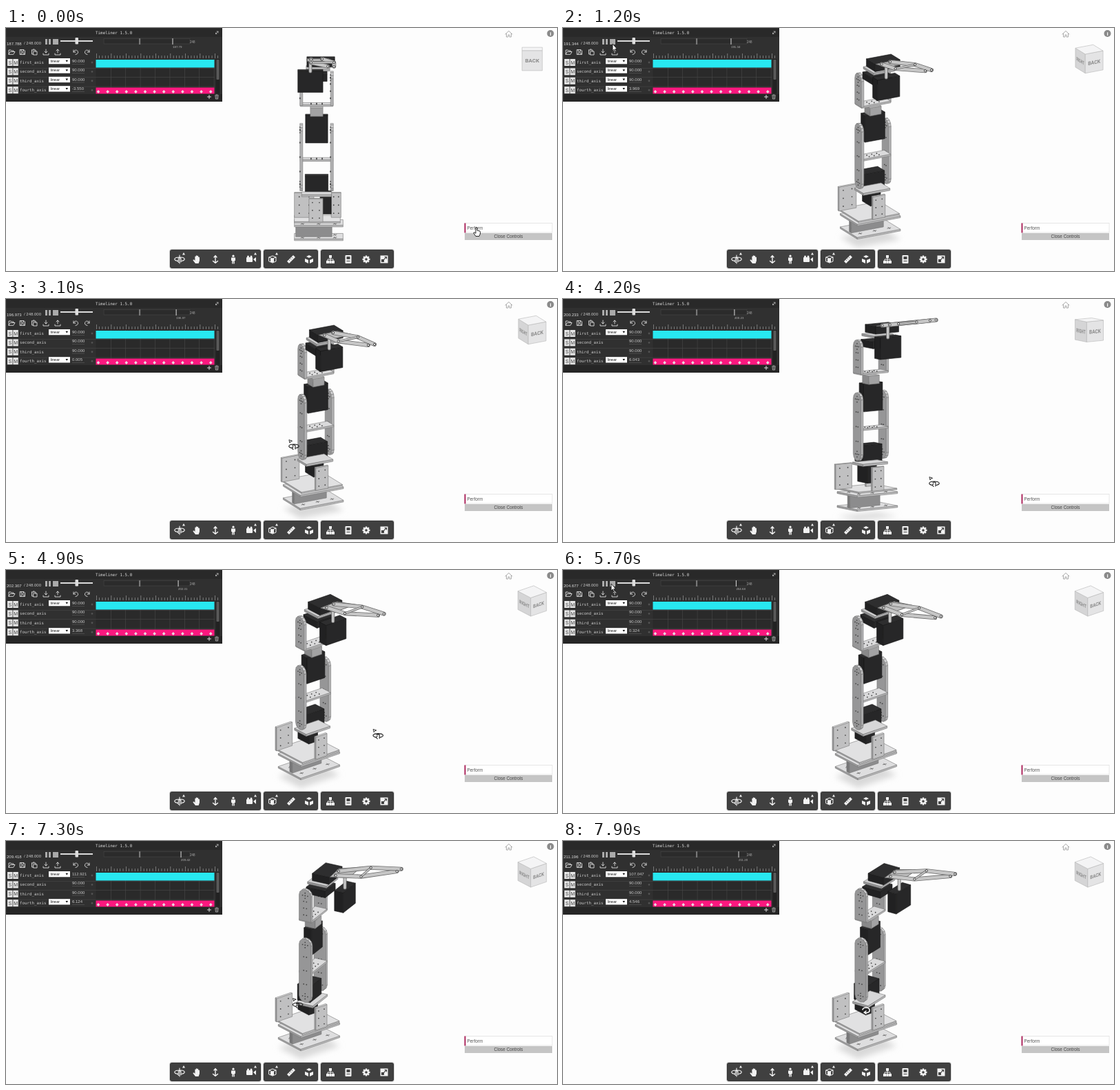
Write an HTML page that moves like this. It is 800x353 px and loops after 8 s.

```html
<!DOCTYPE html>
<html lang="en">
<head>
<meta charset="utf-8">
<title>Robot arm timeline</title>
<style>
html, body { margin: 0; width: 100%; height: 100%; overflow: hidden; background: #fdfdfd; }
svg { display: block; width: 800px; height: 353px; }
text { font-family: "Liberation Sans", Arial, sans-serif; }
.mono { font-family: "DejaVu Sans Mono", monospace; }
.line { fill: none; stroke-linecap: round; stroke-linejoin: round; }
</style>
</head>
<body>
<svg id="stage" viewBox="0 0 800 353"></svg>
<script>
const LOOP = 8000;
const stage = document.getElementById('stage');

// ---- drawing helpers ----
const rect = (x, y, w, h, fill, more = '') =>
  `<rect x="${x}" y="${y}" width="${w}" height="${h}" fill="${fill}" ${more}/>`;
const label = (x, y, size, fill, str, more = '') =>
  `<text x="${x}" y="${y}" font-size="${size}" fill="${fill}" ${more}>${str}</text>`;
const dot = (x, y, r, fill, more = '') =>
  `<circle cx="${x}" cy="${y}" r="${r}" fill="${fill}" ${more}/>`;
const line = (d, color, width) =>
  `<path class="line" d="${d}" stroke="${color}" stroke-width="${width}"/>`;
const fillPath = (d, color) => `<path d="${d}" fill="${color}"/>`;
const at = (x, y, body) => `<g transform="translate(${x} ${y})">${body}</g>`;
const range = (n, fn) => Array.from({ length: n }, (_, i) => fn(i));
const many = (n, fn) => range(n, fn).join('');
const xy = p => p[0].toFixed(2) + ' ' + p[1].toFixed(2);
const pathOf = pts => 'M' + pts.map(xy).join('L');

// ---- motion: each key is a time followed by its values ----
function track(keys, t) {
  const i = keys.findIndex(key => key[0] > t);
  if (i < 1) return keys.at(i).slice(1);
  const [a, b] = [keys[i - 1], keys[i]];
  const k = (t - a[0]) / (b[0] - a[0]);
  return a.slice(1).map((v, j) => v + (b[j + 1] - v) * k);
}
const playTime = t => 187.785 + t * .002963;
const firstAxis = [[6250, 90], [6450, 120.776], [6500, 120.776], [7900, 107.047]];
const fourthAxis = [[0, -3.556], [1200, 3.971], [3100, 0], [4200, 6.047], [5700, .314], [6500, 8.235], [7900, 4.546]];
const pointer = [[100, 683, 296], [300, 430, 210], [900, 480, 240], [1150, 72, 27], [1700, 72, 27], [2300, 650, 300],
  [3000, 418, 213], [3200, 418, 213], [4200, 539, 267], [4900, 541, 240], [5500, 70, 24], [5900, 70, 24],
  [6450, 395, 221], [6600, 395, 221], [7700, 440, 246]];

// yaw, pitch, screen centre, zoom
const fromBack = [0, 9, 451, 180, 1.01], fromAbove = [29, 20, 450, 175, 1.025];
const views = [[300, ...fromBack], [900, ...fromAbove], [3200, ...fromAbove],
  [4200, 35, 8, 447, 176, 1.02], [4500, 39, 25, 446, 172, 1.04]];

// ---- solids: x right, y up, z towards the viewer ----
const rad = deg => deg * Math.PI / 180;
function lens(yaw, pitch, cx, cy, zoom) {
  const [c, s, cp, sp] = [Math.cos(rad(yaw)), Math.sin(rad(yaw)), Math.cos(rad(pitch)), Math.sin(rad(pitch))];
  return ([x, y, z]) => {
    const near = z * c - x * s;
    return [cx + zoom * (x * c + z * s), cy + zoom * (near * sp - y * cp), near + y * sp * .3];
  };
}
// An outline of [z, y] points, extruded along x.
const prism = (outline, x, width, centre, gray, more) =>
  ({ outline, x0: x - width / 2, x1: x + width / 2, centre, gray, contrast: 1, edge: '#777', marks: [], ...more });
const box = (x, y, z, w, h, d, gray, more) =>
  prism([[-1, -1], [1, -1], [1, 1], [-1, 1]].map(([i, j]) => [z + i * d / 2, y + j * h / 2]), x, w, [x, y, z], gray, more);
const servo = (x, y, z, w, h, d, more) => box(x, y, z, w, h, d, 46, { edge: '#161617', ...more });
const grid = (cols, rows, fn) => range(cols * rows, i => fn((i % cols + .5) / cols - .5, (Math.floor(i / cols) + .5) / rows - .5));
const basePlate = (x, y, z, w, d) => box(x, y, z, w, 2.5, d, 222,
  { base: true, crosses: true, marks: grid(3, 2, (u, v) => [x + u * w, y + 1.2, z + v * d]) });
const wall = (x, y, z, w, h) => box(x, y, z, w, h, 3, 226,
  { marks: grid(2, 3, (u, v) => [x + u * w, y + v * h, z + 1.5]) });

// A flat bar standing between two joints, rounded where asked.
function leg(x, low, high, roundLow) {
  const r = 9.5, arc = (y, from) => range(7, i => [r * Math.cos(rad(from + i * 30)), y + r * Math.sin(rad(from + i * 30))]);
  const outline = [...(roundLow ? arc(low, 180) : [[-r, low], [r, low]]), ...arc(high, 0)];
  const cluster = y => range(5, i => [x - 2, y + (i && 4 * Math.sin(i * Math.PI / 2)), i && 4 * Math.cos(i * Math.PI / 2)]);
  const marks = [...cluster(high), ...(roundLow ? cluster(low) : []),
    ...grid(2, 3, (u, v) => [x - 2, (low + high) / 2 + v * (high - low) * .8, u * 9])];
  return prism(outline, x, 4, [x, (low + high) / 2, 0], 208, { arm: true, marks });
}
const crossbar = y => box(0, y, 0, 47, 2.5, 19, 218,
  { arm: true, marks: grid(3, 2, (u, v) => [u * 24, y + 1.2, v * 14]) });

const arm = { arm: true };
const robot = [
  basePlate(3, -126, -13, 70, 50),
  box(-4, -116, -12, 52, 18, 6, 165, { base: true }),
  basePlate(3, -106, -13, 70, 50),
  box(1, -100, -13, 66, 2, 58, 225, { base: true }),
  wall(-18, -84, -43, 28, 36), wall(28, -84, -43, 14, 36), wall(-1, -82, 18, 20, 34),
  servo(13, -78, -28, 16, 30, 24),
  box(0, -62, -2, 43, 3, 26, 215, arm),
  servo(0, -47, -6, 33, 24, 20, arm),
  crossbar(-11),
  servo(0, 34, 0, 32, 40, 12, arm),
  box(0, 59, 0, 18, 12, 16, 190, arm),
  crossbar(69),
  ...[-22, 22].flatMap(x => [leg(x, -47, 32, true), leg(x, 69, 108, false)]),
  servo(0, 112, 12, 30, 10, 30, arm),
  box(2, 124, 14, 34, 3, 30, 205, arm),
  servo(6, 134, 19, 40, 11, 26, arm),
  servo(-9, 112, 55, 36, 31, 14, arm)
];

function drawSolid(solid, see) {
  const { outline, x0, x1, gray, contrast, edge, marks, crosses } = solid;
  const near = outline.map(([z, y]) => see([x0, y, z])), far = outline.map(([z, y]) => see([x1, y, z]));
  const faces = [[near, .72], [[...far].reverse(), .72], ...outline.map(([z, y], i) => {
    const j = (i + 1) % outline.length, dz = outline[j][0] - z, dy = outline[j][1] - y;
    return [[near[j], near[i], far[i], far[j]], .72 + (.13 * Math.max(dy, 0) + .28 * Math.max(-dz, 0)) / Math.hypot(dz, dy)];
  })];
  const area = pts => pts.reduce((sum, p, i) => {
    const q = pts[(i + 1) % pts.length];
    return sum + p[0] * q[1] - q[0] * p[1];
  }, 0);
  const holes = marks.map(m => {
    const [x, y] = see(m);
    return crosses ? line(`M${x - 2.4} ${y + .5}l4.8-1M${x - 1.3} ${y - 1}l2.6 2`, '#555', .7) : dot(x, y, .9, '#484848');
  });
  return faces.filter(([pts]) => area(pts) < -.01).map(([pts, tone]) => {
    const v = Math.round(gray * (1 - contrast * (1 - tone)));
    return `<path d="${pathOf(pts)}z" fill="rgb(${v},${v},${v + 1})" stroke="${edge}" stroke-width=".6" stroke-linejoin="round"/>`;
  }).join('') + holes.join('');
}

function drawGripper(see, lift) {
  const point = (x, z) => see([x, 141 + (z - 38) * (.09 + lift * .0145), z]);
  const jaws = [[[-8, 40], [-8, 80], [16, 124]], [[8, 36], [25, 78], [25, 126]]].map(j => j.map(p => point(...p)));
  const palm = [[-14, 34], [17, 32], [25, 62], [-13, 64]].map(p => point(...p));
  const bar = (pts, w) => line(pathOf(pts), '#6c6c6c', w) + line(pathOf(pts), '#c6c6c6', w - 1.6);
  return bar([point(-9, 55), see([-9, 126, 55])], 5) +
    `<path d="${pathOf(palm)}z" fill="#bcbcbc" stroke="#6c6c6c" stroke-linejoin="round"/>` +
    jaws.map(j => bar(j, 6)).join('') + bar([jaws[0][1], jaws[1][1]], 3.4) +
    jaws.flat().map(([x, y]) => dot(x, y, 1.6, '#eee', 'stroke="#3a3a3a" stroke-width=".9"')).join('');
}

function drawRobot(t) {
  const [yaw, ...rest] = track(views, t);
  const still = lens(yaw, ...rest), turned = lens(yaw + track(firstAxis, t)[0] - 90, ...rest);
  const order = part => part.base ? part.centre[1] - 1000 : (part.arm ? turned : still)(part.centre)[2];
  const sorted = [...robot].sort((a, b) => order(a) - order(b));
  const foot = [[-32, -38], [38, -38], [38, 12], [-32, 12]].map(([x, z]) => still([x, -140, z]));
  return `<path d="${pathOf(foot)}z" fill="#d9d9d9" filter="url(#soft)" opacity="${Math.min(1, yaw / 29)}"/>` +
    sorted.map(part => drawSolid(part, part.arm ? turned : still)).join('') +
    drawGripper(turned, track(fourthAxis, t)[0]);
}

const viewCube = box(0, 0, 0, 29.5, 29.5, 29.5, 244, { contrast: .45, edge: '#b5b5b5' });
function drawCube(t) {
  const [yaw, pitch] = track(views, t);
  const see = lens(yaw, pitch, 764, 45, 1), h = 14.75;
  const face = (corners, word) => {
    const [o, u, v] = corners.map(see);
    const m = [u[0] - o[0], u[1] - o[1], v[0] - o[0], v[1] - o[1]].map(n => n / 32);
    return `<g transform="matrix(${m.join()},${o[0]},${o[1]})">` +
      label(16, 19.5, 8.6, '#8a8a8a', word, 'text-anchor="middle" font-weight="700" style="font-family:Roboto,sans-serif"') + '</g>';
  };
  return drawSolid(viewCube, see) + face([[-h, h, -h], [-h, h, h], [-h, -h, -h]], 'RIGHT') +
    face([[-h, h, h], [h, h, h], [-h, -h, h]], 'BACK');
}

// ---- pointer shapes ----
const arrow = '<path d="M0-4V6L2.2 4 3.8 7.4 5.2 6.7 3.7 3.5H6.5z" fill="#fff" stroke="#111" stroke-width=".8"/>';
const hand = '<path d="M-1-6q1.3-1 2 0V-2L5-1Q6 0 5.5 3L4 6.5H-1L-4 2Q-4 .5-2.6 1L-1 2.4z" fill="#fff" stroke="#111" stroke-width=".9"/>';
const orbitRing = c => line('M-3 2.5C-10 1-8-3 0-3S10 1 3 2.5M-3 2.5l2-2M-3 2.5l2 2M-2-1Q0-3 2-1V4', c, 1.1);
const orbit = line('M-7-8l1 4 1.2-2 2-.6z', '#222', .9) + at(0, 1, orbitRing('#222'));
const spin = line('M-5-1C-4-5 4-5 5-1S2 4-2 3M0 1L-3 3 0 5', '#fff', 1.5);
function drawPointer(t) {
  const [x, y] = track(pointer, t);
  const shape = x < 314 && y < 107 ? arrow : x > 660 ? hand : t > 7600 ? spin : t > 1150 && t < 2500 ? arrow : orbit;
  return at(x, y, shape);
}

// ---- timeline panel ----
const rowY = i => 50 + i * 13.4;
const names = ['first_axis', 'second_axis', 'third_axis', 'fourth_axis'];

function panel() {
  const small = [
    [8, 'M-4 3V-3h3l1 1h3v1.5M-4 3l2-3.5h7L3 3z'], [24, 'M-3.5-3.5H2L3.5-2V3.5h-7zM-2-3.5V-1H1.5V-3.5M-2 3.5V1H2v2.5'],
    [41, 'M-3.5-3H2V-1M-3.5-3V3h2M-1-1H4V4H-1zM-1.5-4H0'], [58, 'M0-4V1M-2-1L0 1 2-1M-4 2v2h8V2'],
    [75, 'M0 1V-4M-2-2L0-4 2-2M-4 2v2h8V2'], [101, 'M-3-3V0H0M-3 0C-1-5 4-3 3.5 1Q3 3 0 3.5'], [118, 'M3-3V0H0M3 0C1-5-4-3-3.5 1Q-3 3 0 3.5']
  ];
  return rect(0, 0, 314, 107, '#303030') + rect(0, 0, 314, 13, '#292929') + rect(0, 96, 314, 11, '#262626') +
    label(130, 9.2, 5.9, '#ddd', 'Timeliner 1.5.0', 'class="mono"') +
    line('M304.5 8.5l3.5-3.5M306 5h2v2M304.5 7v1.5H306', '#ccc', .7) +
    label(26, 24, 6, '#ccc', '/ 248.000') +
    rect(57, 16, 3, 8, '#aaa') + rect(62, 16, 3, 8, '#aaa') + rect(68, 16, 8, 8, '#aaa') +
    rect(79, 18, 47, 1.8, '#eee') + rect(100.5, 14, 4.5, 9.5, '#ddd', 'rx="1"') +
    rect(142, 15.5, 125, 7.5, '#2b2b2b', 'stroke="#484848" stroke-width=".6"') + rect(193, 15, 2.2, 9, '#777') +
    label(267, 22, 4.5, '#aaa', '248') +
    small.map(([x, d]) => at(x, 35, line(d, '#ddd', .9))).join('') +
    many(42, i => rect(131 + i * 4.3, i % 5 ? 40 : 37, .7, i % 5 ? 4 : 7, '#999')) +
    rect(130.5, 45, 173, 50.5, '#2a2a2a') +
    many(8, i => rect(152 + i * 21.4, 45, .6, 50, '#484848')) +
    many(3, i => rect(0, 58 + i * 13.4, 303, .6, '#484848')) +
    rect(130.5, 46, 172, 11.5, '#28e8f1') + rect(130.5, 86.5, 172, 9, '#fb187f') +
    many(13, i => at(134 + i * 13.6, 92.5, fillPath('M0-2.4L2.3 0 0 2.4-2.3 0z', '#e9d9df'))) +
    rect(304.5, 45, 6, 50.5, '#222') + rect(305.5, 46, 4, 29, '#5a5a5a', 'rx="1"') +
    names.map((name, i) => {
      const y = rowY(i);
      return rect(2, y - 5, 7.5, 10, '#e6e6e6') + rect(10.3, y - 5, 7.5, 10, '#e6e6e6') +
        label(3.4, y + 2.5, 7, '#444', 'S') + label(11.2, y + 2.5, 7, '#444', 'M') +
        label(20, y + 2, 5.8, '#ccc', name, 'class="mono"') + rect(96, y + 2, 18, .5, '#666') +
        at(125, y, fillPath('M0-1.7L1.7 0 0 1.7-1.7 0z', '#555'));
    }).join('') +
    line('M292.5 100h5M295 97.5v5', '#ddd', 1) + at(306, 100, line('M-2.5-2h5M-1-3h2M-2-1l.4 4h3.2L2-1M0-1v3', '#ccc', .7));
}

function drawPanel(t) {
  const now = playTime(t), x = 242 + t * .00165;
  const values = [track(firstAxis, t)[0], 90, 90, track(fourthAxis, t)[0]];
  return label(1, 24.5, 6, '#ddd', now.toFixed(3)) + rect(x - .5, 15, 1, 9, '#ddd') +
    label(x, 28.5, 4.4, '#bbb', now.toFixed(2)) +
    values.map((value, i) => {
      const y = rowY(i) - 2;
      const menu = i % 3 === 0 || t < 1800 ? rect(62, y - 4, 31, 8.3, '#fff') + label(64.5, y + 2, 5.6, '#222', 'linear') +
        fillPath(`M86.5 ${y - 1.2}h3.6l-1.8 2.8z`, '#111') : '';
      return menu + label(96, y + 2, 6, '#ccc', value.toFixed(3));
    }).join('');
}

// ---- viewer controls ----
function toolbar() {
  const c = '#f2f2f2';
  const icons = [
    [252, orbitRing(c) + line('M0-6V6', c, 1.1)],
    [277, fillPath('M-2 6L-5.5 1.5Q-5.5 0-4 .5L-2.6 2V-4Q-2-5-1.2-4V-1-5.3Q-.3-6.3.5-5.3V-1-4.8Q1.4-5.6 2.2-4.6V-.5-3Q3.2-4 4-2.6V2L2.6 6z', c)],
    [304, line('M0-5V5M-2-3L0-5.4 2-3M-3.5 2.5L0 5.4 3.5 2.5', c, 1.4)],
    [330, dot(0, -4.8, 1.6, c) + fillPath('M-3-2.5H3V2H1.8V6.5H.4V3H-.4V6.5H-1.8V2H-3z', c)],
    [356, rect(-7, -3, 9, 7, c, 'rx="1"') + fillPath('M3 0L7-3V4z', c) + dot(-4.5, -4, 1.5, c) + dot(0, -4, 1.5, c)],
    [387, line('M-5-3L0-5 5-3V3L0 5-5 3zM-5-3L0-1 5-3M0-1V5', c, 1) + rect(-3, -1, 5, 5, c)],
    [414, fillPath('M-6 3L3-6 6-3-3 6z', c) + line('M-3 1l1 1M-1-1l1 1M1-3l1 1', '#444', .8)],
    [440, fillPath('M0-6L4-4 0-2-4-4zM-6-1L-1 1V6L-6 3.5zM6-1L1 1V6L6 3.5z', c)],
    [471, rect(-2, -6, 4, 4, c) + rect(-6, 2, 4, 4, c) + rect(-1.7, 2, 3.4, 4, c) + rect(2, 2, 4, 4, c) + line('M0-2V2M-4 2V0H4V2', c, 1)],
    [497, rect(-4.5, -6, 9, 12, c, 'rx="1"') + rect(-2.5, -4, 5, 4, '#444') + rect(-2.5, 2, 5, 1, '#444')],
    [523, many(4, i => rect(-1.2, -5.5, 2.4, 11, c, `transform="rotate(${i * 45})"`)) + dot(0, 0, 4, c) + dot(0, 0, 1.8, '#444')],
    [549, rect(-5.5, -5.5, 11, 11, c) + rect(-4, 0, 4, 4, '#444') + line('M0 0L3.5-3.5M1-3.5H3.5V-1', '#444', 1.1)]
  ];
  const group = ([x, w]) => rect(x, 322, w, 27, '#404040', 'rx="3" stroke="#000" stroke-opacity=".18" stroke-width="2"');
  return [[238, 132], [374, 79], [457, 106]].map(group).join('') +
    icons.map(([x, body]) => at(x, 336, body)).join('') +
    [258, 362, 393].map(x => fillPath(`M${x - 2} 329.5h4l-2-3.5z`, c)).join('');
}

function controls() {
  return line('M725 9L730 4.3 735 9M726.5 8.5V13H729V10H731V13H733.5V8.5', '#aaa', 1) +
    dot(790.5, 8, 5, '#8a8a8a') + label(790.5, 11, 8, '#fff', 'i', 'text-anchor="middle" font-weight="700"') +
    rect(666, 283.5, 127, 13.5, '#fff', 'stroke="#ddd" stroke-width=".7"') + rect(665.5, 283.5, 2, 14, '#b02a60') +
    label(669.5, 292.5, 6.4, '#555', 'Perform') + rect(666, 298, 127, 10, '#c5c5c5') +
    label(729.5, 305.3, 6.4, '#444', 'Close Controls', 'text-anchor="middle"');
}

stage.innerHTML = '<defs><filter id="soft" x="-20%" y="-50%" width="140%" height="200%"><feGaussianBlur stdDeviation="4"/></filter></defs>' +
  '<g id="robot"></g>' + controls() + '<g id="cube"></g>' + panel() + '<g id="values"></g>' + toolbar() + '<g id="pointer"></g>';
const layers = { robot: drawRobot, cube: drawCube, values: drawPanel, pointer: drawPointer };

function render(now) {
  const t = now % LOOP;
  for (const id in layers) document.getElementById(id).innerHTML = layers[id](t);
}
const start = performance.now();
function tick() {
  render(performance.now() - start);
  requestAnimationFrame(tick);
}
tick();
</script>
</body>
</html>
```
